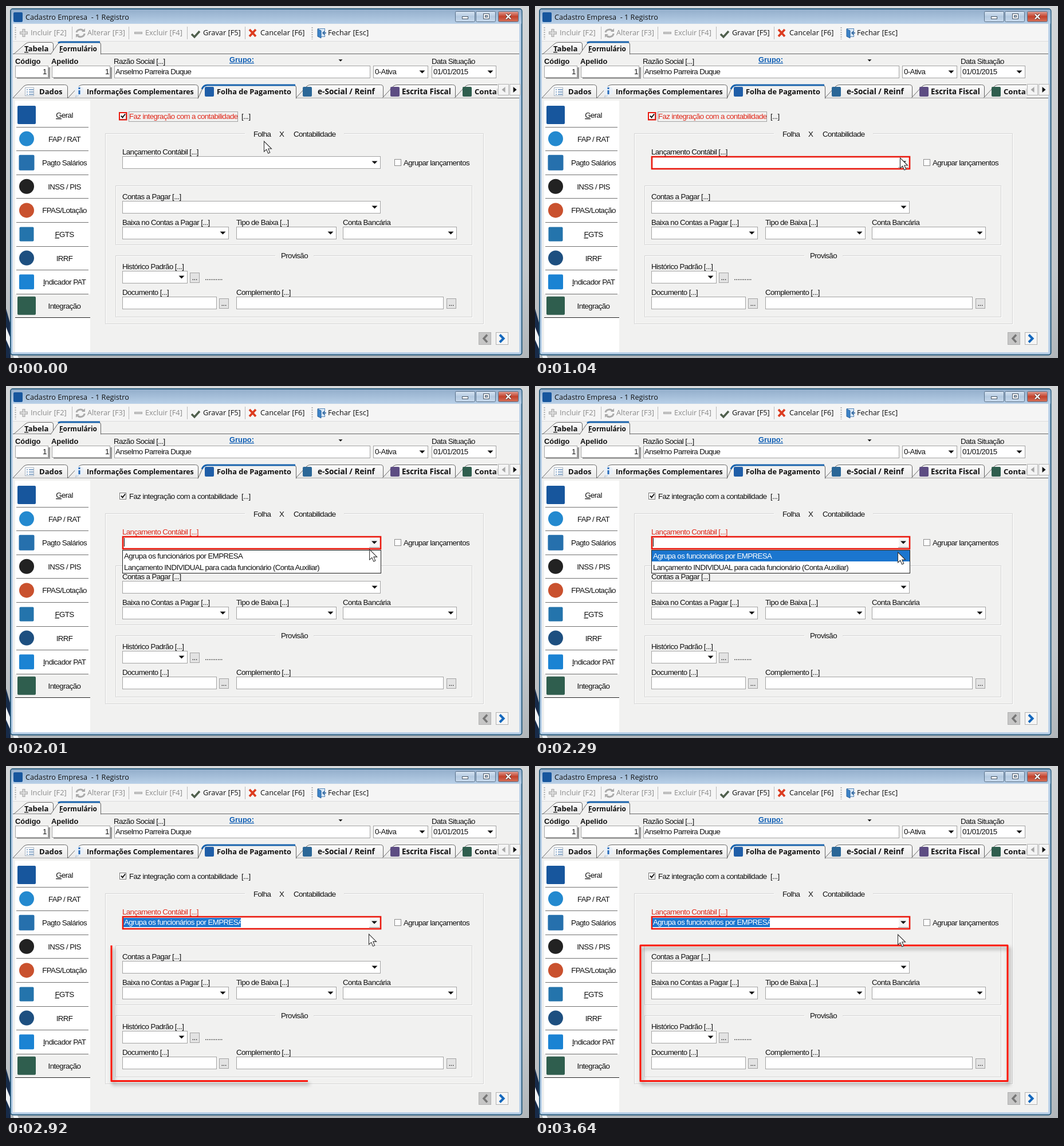
An HTML page for the animation above (3.78 s loop, 913 px wide and 614 px high).

```html
<!DOCTYPE html>
<html lang="pt-BR">
<head>
<meta charset="utf-8">
<title>Cadastro Empresa</title>
<style>
html, body { margin: 0; width: 913px; height: 614px; overflow: hidden; }
svg { display: block; }
text { white-space: pre; fill: #111; }
.ui { font: 13.3px "Liberation Sans", Arial, sans-serif; letter-spacing: -.6px; }
.b { font: bold 12.9px "Liberation Sans", Arial, sans-serif; }
.bar { font: 12.8px "Open Sans", sans-serif; }
.tab { font: bold 13.1px "Open Sans", sans-serif; }
</style>
</head>
<body>
<svg id="stage" width="913" height="614" viewBox="0 0 913 614">
<defs>
  <linearGradient id="title" x2="0" y2="1"><stop stop-color="#93aecb"/><stop offset="1" stop-color="#bad1e9"/></linearGradient>
  <linearGradient id="btn" x2="0" y2="1"><stop stop-color="#d8e5f3"/><stop offset=".5" stop-color="#b4cae1"/><stop offset="1" stop-color="#c8daed"/></linearGradient>
  <linearGradient id="close" x2="0" y2="1"><stop stop-color="#e0a096"/><stop offset=".5" stop-color="#c4422c"/><stop offset="1" stop-color="#d2715b"/></linearGradient>
  <linearGradient id="desk" x2="0" y2="1"><stop stop-color="#d3d6d8"/><stop offset=".75" stop-color="#c3c7ca"/><stop offset="1" stop-color="#b2b7bb"/></linearGradient>
  <linearGradient id="tabFill" x2="0" y2="1"><stop stop-color="#fdfdfd"/><stop offset="1" stop-color="#e8e8e8"/></linearGradient>
  <filter id="shadow" x="-10%" y="-10%" width="120%" height="125%"><feDropShadow dx="3" dy="5" stdDeviation="3" flood-opacity=".4"/></filter>
  <clipPath id="tabClip"><rect x="10" y="130" width="848" height="40"/></clipPath>
</defs>
</svg>
<script>
const stage = document.getElementById('stage');
const LOOP = 3780, RED = '#e9170c', PANEL = '#f1f1f0', BLUE = '#17569d';
const INK = '#111', LINE = '#a3a3a3', EDGE = '#666';

const rect = (x, y, w, h, fill, stroke = 'none', more = '') =>
  `<rect x="${x}" y="${y}" width="${w}" height="${h}" fill="${fill}" stroke="${stroke}" ${more}/>`;
const path = (d, stroke, width = 1, fill = 'none', more = '') =>
  `<path d="${d}" stroke="${stroke}" stroke-width="${width}" fill="${fill}" ${more}/>`;
const disc = (x, y, r, fill) => `<circle cx="${x}" cy="${y}" r="${r}" fill="${fill}"/>`;
// "_x" underlines the letter x
const text = (x, y, s, cls = 'ui', more = '') =>
  `<text x="${x}" y="${y}" class="${cls}" ${more}>` +
  s.replace(/_(.)/g, '<tspan text-decoration="underline">$1</tspan>') + '</text>';
const size = n => `style="font-size:${n}px"`;
const group = (id, body) => `<g id="${id}">${body}</g>`;
const box = (x, y, w, h) => rect(x + .5, y + .5, w - 1, h - 1, '#fff', LINE);
const arrow = (x, y, r = 5) => path(`M${x - r} ${y - r / 2}h${2 * r}l${-r} ${r}z`, 'none', 0, INK);
const combo = (x, y, w, h = 22) => box(x, y, w, h) + arrow(x + w - 10.5, y + h / 2);
const dots = (x, y) => rect(x + .5, y + .5, 16, 17, '#e3e3e3', LINE) + text(x + 3.5, y + 13, '...');

function windowFrame() {
  const button = (x, w, fill) => rect(x + .5, 9.5, w, 18, fill, '#5b7189', 'rx="2"');
  return rect(0, 0, 913, 614, 'url(#desk)') +
    path('M0 528L8 556V614H0z', 'none', 0, '#172b49') +
    path('M0 560L22 614H14L0 582z', 'none', 0, '#eef1f4') +
    rect(8, 5, 892.500, 603.500, '#bad1e9', '#2c5f80', 'rx="4" stroke-width="2"') +
    rect(9, 6, 891, 26, 'url(#title)', 'none', 'rx="3"') +
    rect(12, 31, 884, 573, PANEL) +
    rect(13, 11, 16, 17, BLUE, 'none', 'rx="2"') +
    text(34, 24, 'Cadastro Empresa  - 1 Registro', 'bar', size(12.7)) +
    button(784, 34, 'url(#btn)') + button(820, 34, 'url(#btn)') + button(859, 35, 'url(#close)') +
    rect(796.5, 18.5, 10, 4, '#fff', '#4a5868') +
    rect(833.5, 13.5, 10, 9, '#fff', '#4a5868') + rect(836.5, 16.5, 4, 3, '#a9bfd6', '#4a5868') +
    path('M873 14.5l8 8m0-8l-8 8', '#5a3530', 4) + path('M873 14.5l8 8m0-8l-8 8', '#fff', 2.4);
}

function toolbar() {
  const gray = 'style="fill:#8a8a8a"';
  const seps = [115, 214, 316, 417].map(x => path(`M${x + .5} 36V58`, '#b9b9b9')).join('');
  return rect(12, 32, 884, 29, '#f5f5f5') + path('M12 61.5H896', '#dcdcdc') + seps +
    path('M16.5 37V58M534.5 37V58', '#aaa', 2, 'none', 'stroke-dasharray="2 2"') +
    path('M31 40v14M24 47h14', '#aaa', 5) + path('M31 41v12M25 47h12', '#ddd', 2.5) +
    path('M123 46a7 6 0 0 1 12-3M137 48a7 6 0 0 1-12 4', '#aaa', 3) +
    path('M132 45h6v-6zM128 49h-6v6z', 'none', 0, '#aaa') +
    path('M224 47h14', '#aaa', 4) + path('M225 47h12', '#d5d5d5', 1.5) +
    path('M324 49l5 5 9-10', '#4f5f4c', 3.6) +
    path('M425 41l11 12M436 41l-11 12', '#dc3c20', 3.8) +
    rect(544.5, 39.5, 12, 14, '#d9e8f7', '#5987b7') + path('M544 40l6 3v13l-6-3z', '#2d649d', 1, '#3d83c7') +
    path('M559 47h-5m2-3l-3 3 3 3', '#2d649d', 1.5) +
    text(43, 51, 'Incluir [F2]', 'bar', gray) + text(142, 51, 'Alterar [F3]', 'bar', gray) +
    text(243, 51, 'Excluir [F4]', 'bar', gray) + text(344, 51, 'Gravar [F5]', 'bar') +
    text(444, 51, 'Cancelar [F6]', 'bar') + text(562, 51, 'Fechar [Esc]', 'bar');
}

function header() {
  const raised = (x, w) => rect(x + 3, 107, w, 20, '#999') + box(x, 104, w, 21);
  return path('M12 83.5H896', EDGE) +
    path('M14 83.5L34 66Q37 63.5 41 63.5H79Q82.5 63.5 82.5 67V83', EDGE, 1, 'url(#tabFill)') +
    path('M78 84.5L89 68Q92 63.5 96 63.5H162Q165.5 63.5 165.5 67V84.5', EDGE, 1, PANEL) +
    rect(79, 83, 86, 3, PANEL) + path('M91 64.5Q93 63 96 63H164', '#1a64ad', 3) +
    text(32, 79, '_Tabela', 'tab') + text(93, 79, '_Formulário', 'tab', size(11.9)) +
    text(16, 101, 'Código', 'b') + text(79, 101, 'Apelido', 'b') +
    text(188, 101, 'Razão Social [...]') + text(743, 101, 'Data Situação') +
    text(390, 98, 'Grupo:', 'b', 'style="fill:#0b5cb4" text-decoration="underline"') + arrow(584, 95, 3.5) +
    raised(16, 58) + raised(80, 102) + text(64, 119, '1') + text(173, 119, '1') +
    box(189, 104, 447, 22) + text(191, 119, 'Anselmo Parreira Duque') +
    combo(641, 104, 96) + text(644, 119, '0-Ativa') + combo(743, 104, 113) + text(746, 119, '01/01/2015');
}

function tabs() {
  const tab = (x, end) =>
    path(`M${x} 160.5L${x + 19} 140Q${x + 22} 137.5 ${x + 26} 137.5H${end - 5}Q${end} 137.5 ${end} 142V160.5`, EDGE, 1, 'url(#tabFill)');
  const icon = (x, fill) => rect(x, 141, 16, 17, fill, 'none', 'rx="2"');
  const scroll = (x, dir, fill) => rect(x + .5, 136.5, 18, 19, '#f4f4f4', '#b3b3b3') +
    path(`M${x + 9.5 - 3 * dir} 141v10l${6 * dir}-5z`, 'none', 0, fill);
  return path('M12 160.5H896', EDGE) +
    '<g clip-path="url(#tabClip)">' +
    tab(12, 107.5) + tab(108, 335.5) + tab(506, 658.5) + tab(657, 784.5) + tab(783, 905) +
    path('M335 161.5L343 144Q346 138.5 351 138.5H503Q506.5 138.5 506.5 142V161.5', EDGE, 1, PANEL) +
    rect(336, 160, 170, 2, PANEL) + path('M342 145Q345 138 351 138H505', '#1a64ad', 3) +
    rect(33.5, 142.5, 15, 14, '#fff', '#a9b5c2') +
    path('M36 146h2m2 0h8M36 150h2m2 0h8M36 154h2m2 0h8', '#5e88b5', 1.5) +
    disc(128, 148, 8, '#e9f0f8') + path('M123 155l-2 4 6-3', '#b6c3d1', 1, '#e9f0f8') +
    rect(126.5, 142, 3, 3, '#2469b8') + rect(126.5, 147, 3, 7, '#2469b8') +
    icon(347, '#1f5ea8') + icon(518, '#2b6797') + icon(671, '#5d4d83') + icon(797, '#2f5e4e') +
    text(58, 154, 'Dados', 'tab') + text(141, 154, 'Informações Complementares', 'tab', size(12.4)) +
    text(368, 154, 'Folha de Pagamento', 'tab', size(12.8)) + text(544, 154, 'e-Social / Reinf', 'tab', size(13.6)) +
    text(691, 154, 'Escrita Fiscal', 'tab', size(13.4)) + text(818, 154, 'Contabilidade', 'tab') + '</g>' +
    scroll(859, -1, '#a5a5a5') + scroll(879, 1, INK);
}

function sidebar() {
  const rows = [
    ['_Geral', BLUE, 16], ['FAP / RAT', '#2389cf'], ['Pagto Salários', '#2670ad', 13.5],
    ['INSS / PIS', '#222'], ['FPAS/Lotação', '#c9512e'], ['_FGTS', '#2474ac', 12.5],
    ['IRRF', '#1d4f80'], ['_Indicador PAT', '#1b83d3', 13], ['Integração', '#2f5e4e', 16]
  ];
  return rect(16, 165, 131, 439, '#fff') + rect(16, 503, 131, 41, PANEL) +
    rows.map(([label, fill, half], i) => {
      const y = 190 + i * 41.6, last = i === 8;
      return (half ? rect(36 - half, y - half, 2 * half, 2 * half, fill, 'none', 'rx="2"') : disc(36, y, 13, fill)) +
        text(102, Math.round(y + 5), label, 'ui', 'text-anchor="middle"') +
        path(`M${last ? 16 : 18} ${Math.round(y + 20.5) + .5}H${last ? 147 : 144}`, last ? '#222' : '#707070');
    }).join('');
}

function form() {
  const edge = d => path(d, '#fff', 1, 'none', 'transform="translate(1 1)"') + path(d, '#d2d2d2');
  const nav = (x, fill) => rect(x + .5, 569.5, 21, 21, fill, '#b0b0b0');
  return edge('M417 222.5H173.5V554.5H833.5V222.5H590') + edge('M191.5 313.5H813.5V416.5H191.5z') +
    edge('M470 435.5H191.5V542.5H813.5V435.5H537') +
    text(411, 197, '[...]') + text(432, 228, 'Folha') + text(477, 228, 'X') + text(502, 228, 'Contabilidade') +
    rect(678.5, 267.5, 11, 11, '#fff', '#8c8c8c') + text(694, 278, 'Agrupar lançamentos') +
    text(203, 337, 'Contas a Pagar [...]') + combo(203, 340, 451) +
    text(203, 382, 'Baixa no Contas a Pagar [...]') + combo(203, 385, 186) +
    text(402, 382, 'Tipo de Baixa [...]') + combo(402, 385, 175) +
    text(588, 382, 'Conta Bancária') + combo(588, 385, 199) +
    text(480, 440, 'Provisão') +
    text(203, 459, 'Histórico Padrão [...]') + combo(203, 462, 114) + dots(321, 465) + text(347, 478, '..........') +
    text(203, 504, 'Documento [...]') + box(203, 507, 165, 22) + dots(372, 510) +
    text(402, 504, 'Complemento [...]') + box(402, 507, 362, 22) + dots(769, 510) +
    nav(825, '#c6c6c6') + nav(855, '#f6f6f6') +
    path('M840 573.5l-6 6.5 6 6.5', '#777', 3.5) + path('M862 573.5l6.5 6.5-6.5 6.5', '#1468bd', 4);
}

function liveParts() {
  const first = 'Agrupa os funcionários por EMPRESA';
  const white = 'style="fill:#fff"';
  return group('check', rect(198.5, 186.5, 11, 11, '#fff', '#777') +
      rect(198, 186, 12.5, 12.5, 'none', RED, 'id="checkRed" stroke-width="2"') +
      path('M201 191.5l2.5 3 4.5-6', INK, 2)) +
    text(215, 197, 'Faz integração com a contabilidade', 'ui', 'id="checkText"') +
    rect(214.5, 184.5, 190, 17, 'none', '#555', 'id="focus" stroke-dasharray="1 1"') +
    text(203, 259, 'Lançamento Contábil [...]', 'ui', 'id="label"') +
    combo(203, 262, 451) +
    group('comboRed', rect(204, 263, 450, 21, '#fff', RED, 'stroke-width="2.6"') +
      rect(635, 265, 17, 16, '#f5f5f5') + path('M634 281.5H652', '#999') + arrow(643, 273)) +
    path('M206.5 265V280', INK, 1, 'none', 'id="caret"') +
    group('list', rect(203.5, 286.5, 451, 40, '#fff', '#222') +
      text(206, 301, first) + text(206, 321, 'Lançamento INDIVIDUAL para cada funcionário (Conta Auxiliar)')) +
    group('hover', rect(204, 287, 450, 19, '#1b76cf') + text(206, 301, first, 'ui', white)) +
    group('picked', rect(205, 265, 205, 16, '#1b76cf') + text(206, 277, first, 'ui', white)) +
    path('M184 313V549.5H825V313z', '#fb140a', 3, 'none', 'id="mark" filter="url(#shadow)" stroke-linejoin="round"') +
    path('M0 0V18L4.2 14.2L7.2 21L10.2 19.7L7.3 13H13z', '#333', 1.1, '#fff', 'id="cursor"');
}

stage.insertAdjacentHTML('beforeend',
  windowFrame() + toolbar() + header() + tabs() + sidebar() + form() + liveParts());

const el = id => document.getElementById(id);
const show = (id, on) => el(id).setAttribute('visibility', on ? 'visible' : 'hidden');
const paint = (id, on) => { el(id).style.fill = on ? '#e0281a' : INK; };
const MARK = 2 * (641 + 236.5);

// share of the n equal steps between a and b already taken
const stepped = (t, a, b, n) =>
  t < a ? 0 : Math.min(1, (Math.floor((t - a) / (b - a) * (n - 1) + 1e-6) + 1) / n);
const ease = p => p * p * (3 - 2 * p);
// start, end, steps, dx, dy
const moves = [
  [70, 570, 8, 187, 26], [970, 1040, 2, 0, 3], [1580, 2080, 8, -3, 21],
  [2150, 2290, 3, -1, 4], [2570, 3060, 8, 0, 4]
];

function draw(t) {
  let x = 450.5, y = 236;
  for (const [a, b, n, dx, dy] of moves) {
    const p = ease(stepped(t, a, b, n));
    x += dx * p;
    y += dy * p;
  }
  el('cursor').setAttribute('transform', `translate(${x.toFixed(2)} ${y.toFixed(2)})`);

  const opened = t >= 1240, chosen = t >= 2570;
  show('checkRed', !opened);
  show('focus', !opened);
  paint('checkText', !opened);
  paint('label', opened);
  show('comboRed', t >= 970);
  show('caret', opened && !chosen);
  show('list', opened && !chosen);
  show('hover', t >= 2150 && !chosen);
  show('picked', chosen);

  const start = t < 3140 ? 2570 : 3140;
  const held = start + Math.floor((Math.min(t, start === 2570 ? 3060 : 3640) - start) / 70) * 70;
  const part = Math.min(1, Math.max(0, (held - 2570) / 1060));
  show('mark', part > 0);
  el('mark').setAttribute('stroke-dasharray', part < 1 ? `${part * MARK} ${MARK}` : 'none');
}

const began = performance.now();
function tick() {
  draw((performance.now() - began) % LOOP);
  requestAnimationFrame(tick);
}
draw(0);
requestAnimationFrame(tick);
</script>
</body>
</html>
```
